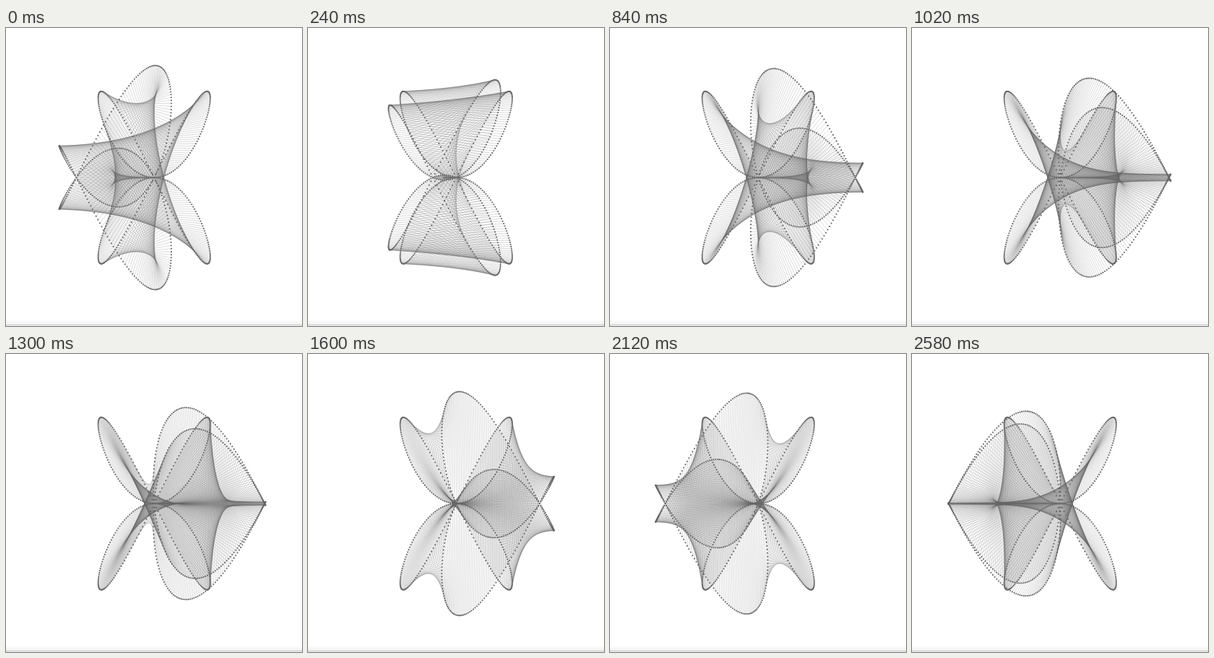
Write an HTML page with a canvas that moves like this. It is 410x413 px and loops after 2.6 s.

```html
<!DOCTYPE html>
<html lang="en">
<head>
<meta charset="utf-8">
<title>Linked curves</title>
<style>
  html, body { margin: 0; width: 100%; height: 100%; overflow: hidden; background: #fff; }
  canvas { display: block; }
</style>
</head>
<body>
<canvas id="stage" width="410" height="413"></canvas>
<script>
const ctx = document.getElementById('stage').getContext('2d');
const W = 410, H = 413, CX = 205.3, CY = 207.3, R = 155.3;
const POINTS = 360, RAD = Math.PI / 180, TAU = 2 * Math.PI;
const INK = '#666';

// The phase advances by STEP degrees; each digit is a hold in units of TICK ms.
const START = 136, STEP = 8, TICK = 20, LOOP = 2600;
const HOLDS = '24332233344454554554333221111222333445551';

const point = (s, phase) => {
  const b = s + phase;
  return [
    CX + R * Math.sin(s) * Math.cos(b),
    CY - R * Math.sin(2 * b) * Math.cos(s)
  ];
};

const curve = phase =>
  Array.from({ length: POINTS }, (_, i) => point(i * TAU / POINTS, phase));

const still = curve(0);

function phaseAt(ms) {
  let left = ms, n = 0;
  while (n < HOLDS.length - 1 && left >= HOLDS[n] * TICK) left -= HOLDS[n++] * TICK;
  return (START + STEP * n) * RAD;
}

function drawEdge() {
  const fade = ctx.createLinearGradient(0, 404, 0, 411);
  fade.addColorStop(0, '#fff');
  fade.addColorStop(1, '#f1f1f1');
  ctx.fillStyle = fade;
  ctx.fillRect(0, 404, W, 7);
  ctx.fillStyle = '#c9c9c9';
  ctx.fillRect(0, 411, W, 1);
  ctx.fillStyle = '#f4f4f4';
  ctx.fillRect(0, 412, W, 1);
}

function drawLinks(a, b) {
  ctx.strokeStyle = INK;
  ctx.lineWidth = 0.25;
  a.forEach((p, i) => {
    ctx.beginPath();
    ctx.moveTo(...p);
    ctx.lineTo(...b[i]);
    ctx.stroke();
  });
}

function drawDots(points) {
  ctx.fillStyle = INK;
  for (const [x, y] of points) {
    ctx.beginPath();
    ctx.arc(x, y, 1.05, 0, TAU);
    ctx.fill();
  }
}

let shown = null;
function draw(ms) {
  const phase = phaseAt(ms);
  if (phase === shown) return;
  shown = phase;
  const moving = curve(phase);
  ctx.fillStyle = '#fff';
  ctx.fillRect(0, 0, W, H);
  drawEdge();
  drawLinks(still, moving);
  drawDots(still);
  drawDots(moving);
}

const origin = performance.now();
function tick() {
  draw((performance.now() - origin) % LOOP);
  requestAnimationFrame(tick);
}
tick();
</script>
</body>
</html>
```
